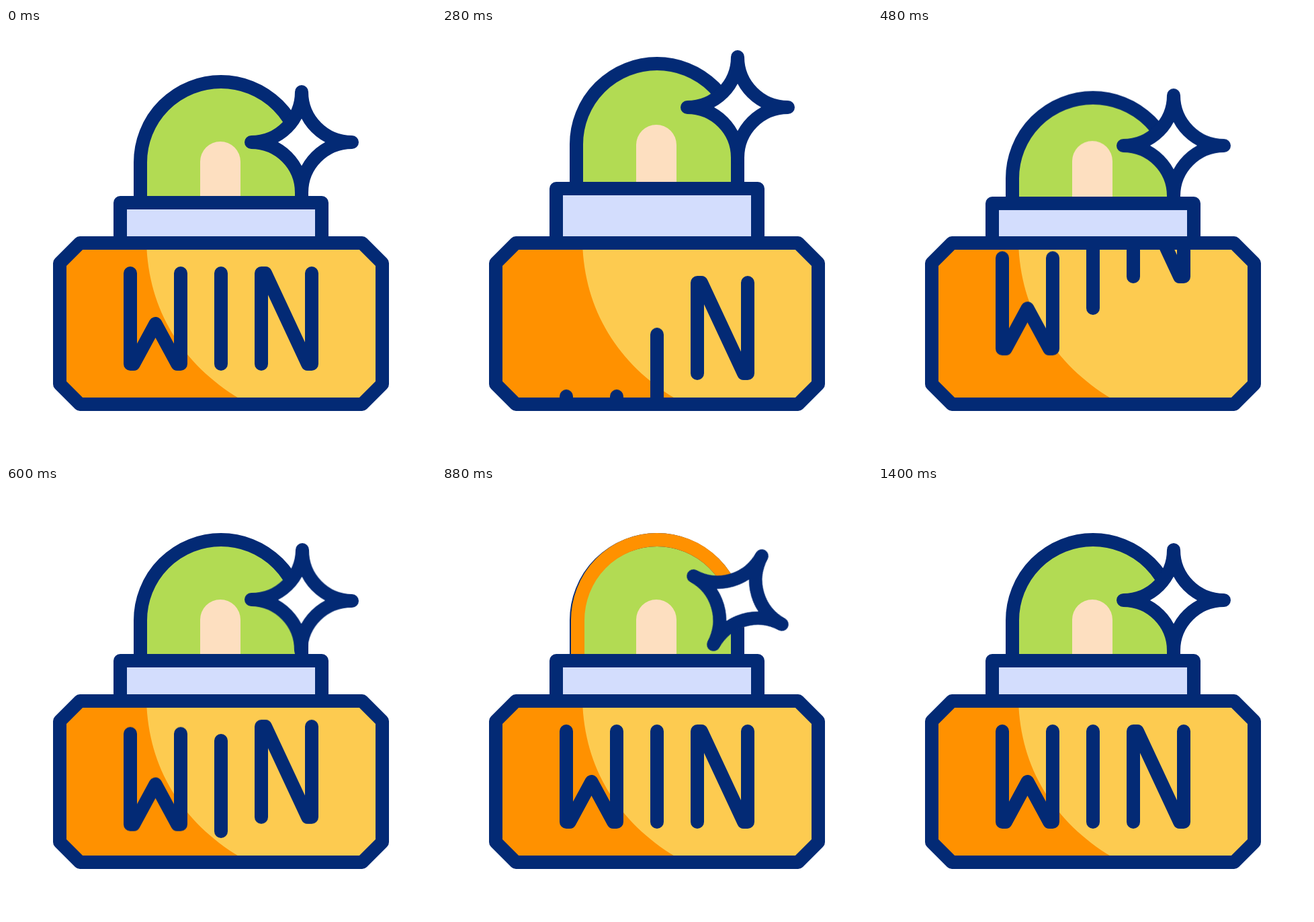
These frames come from a looping animation (640x640 px, 1.48 s). An HTML page:

```html
<!DOCTYPE html>
<html lang="en">
<head>
<meta charset="utf-8">
<title>Win light</title>
<style>
  html, body { margin: 0; width: 100%; height: 100%; overflow: hidden; background: #fff; }
  svg { display: block; width: 100%; height: 100%; }

  .line { stroke: #032a75; stroke-width: 20; stroke-linecap: round; stroke-linejoin: round; }
  .hop, .spin, .glow, .letter { animation: 1480ms linear infinite; }
  .hop { animation-name: hop; animation-timing-function: cubic-bezier(.37, 0, .63, 1); }
  .spin { animation-name: spin; transform-origin: 440px 170px; }
  .glow { fill: none; stroke: #ff9100; }
  .glow.band { animation-name: band, swell; }
  .glow.tail { animation-name: tail, swell; stroke-linecap: round; stroke-dasharray: 0 1500; }
  .w { animation-name: drop-w; }
  .i { animation-name: drop-i; }
  .n { animation-name: drop-n; }

  /* Shared jump; each part sets its own rise and dip. */
  @keyframes hop {
    0%, 5.405% { transform: translateY(0); }
    18.919% { transform: translateY(var(--rise)); }
    29.73% { transform: translateY(var(--dip)); }
    40.541%, 100% { transform: translateY(0); }
  }
  @keyframes spin {
    0%, 39.189% { transform: rotate(0deg); animation-timing-function: cubic-bezier(.37, 0, .63, 1); }
    72.973%, 100% { transform: rotate(180deg); }
  }

  /* The glow fills the dome from the left, then its tail follows. */
  @keyframes band {
    0%, 40.541% { stroke-dasharray: 0 1500; stroke-dashoffset: 0; }
    51.351% { stroke-dasharray: 226 1500; stroke-dashoffset: 0; }
    62.162% { stroke-dasharray: 556 1500; stroke-dashoffset: 0; }
    72.973% { stroke-dasharray: 556 1500; stroke-dashoffset: -226; }
    83.784%, 100% { stroke-dasharray: 556 1500; stroke-dashoffset: -556; }
  }
  @keyframes tail {
    0%, 62.162% { stroke-dashoffset: 0; }
    72.973% { stroke-dashoffset: -226; }
    83.784%, 100% { stroke-dashoffset: -553; }
  }
  @keyframes swell {
    0%, 40.541% { stroke-width: 16; }
    51.351% { stroke-width: 18; }
    72.973% { stroke-width: 23.5; }
    83.784%, 100% { stroke-width: 24; }
  }

  /* Letters leave through the floor and return from the ceiling. */
  @keyframes drop-w {
    0%, 5.405% { transform: translateY(0); animation-timing-function: ease-in; }
    8.108% { transform: translateY(13px); }
    13.514% { transform: translateY(90px); }
    20.27% { transform: translateY(205px); }
    20.28% { transform: translateY(-200px); }
    24.324% { transform: translateY(-141px); }
    32.432% { transform: translateY(-24px); animation-timing-function: ease-out; }
    35.811% { transform: translateY(14px); animation-timing-function: ease-in-out; }
    43.243%, 100% { transform: translateY(0); }
  }
  @keyframes drop-i {
    0%, 10.811% { transform: translateY(0); animation-timing-function: ease-in; }
    13.514% { transform: translateY(13px); }
    18.919% { transform: translateY(90px); }
    24.324% { transform: translateY(182px); }
    25.338% { transform: translateY(205px); }
    25.348% { transform: translateY(-190px); }
    32.432% { transform: translateY(-84px); }
    37.838% { transform: translateY(-8px); animation-timing-function: ease-out; }
    40.541% { transform: translateY(14px); animation-timing-function: ease-in-out; }
    46.622%, 100% { transform: translateY(0); }
  }
  @keyframes drop-n {
    0%, 16.216% { transform: translateY(0); animation-timing-function: ease-in; }
    18.919% { transform: translateY(13px); }
    24.324% { transform: translateY(90px); }
    29.73% { transform: translateY(195px); }
    29.74% { transform: translateY(-175px); }
    32.432% { transform: translateY(-131px); }
    40.541% { transform: translateY(-8px); animation-timing-function: ease-out; }
    43.243% { transform: translateY(12px); animation-timing-function: ease-in-out; }
    49.324%, 100% { transform: translateY(0); }
  }
</style>
</head>
<body>
<svg viewBox="0 0 640 640" role="img" aria-label="WIN">
  <defs>
    <path id="panel" d="M110 320H530L560 350V530L530 560H110L80 530V350Z"/>
    <path id="arc" d="M202 290V200A118 120 0 0 1 320 80A120 120 0 0 1 440 200V290"/>
    <clipPath id="window"><use href="#panel"/></clipPath>
  </defs>

  <path class="line hop" style="--rise:-27px;--dip:28px" fill="#b2db53" d="M200 290V200A120 120 0 0 1 440 200V290"/>
  <path class="hop" style="--rise:-25px;--dip:-1px" fill="#fddfc0" d="M289 300V199A30 30 0 0 1 349 199V300Z"/>
  <use class="glow band" href="#arc"/>
  <use class="glow tail" href="#arc"/>

  <g class="hop" style="--rise:-52px;--dip:6px">
    <path class="line spin" fill="#fff" d="M440 95A75 75 0 0 0 515 170A75 75 0 0 0 440 245A75 75 0 0 0 365 170A75 75 0 0 0 440 95Z"/>
  </g>

  <rect class="line hop" style="--rise:-21px;--dip:1.2px" fill="#d3ddfd" x="170" y="260" width="300" height="100"/>

  <g clip-path="url(#window)">
    <use href="#panel" fill="#fdcb50"/>
    <path fill="#ff9100" d="M70 310H209V320C212 420 262 500 348 552V570H70Z"/>
    <g class="line" fill="none">
      <path class="letter w" d="M185 365V500H190L222.5 440L255 500H260V365"/>
      <path class="letter i" d="M320 365V500"/>
      <path class="letter n" d="M380 500V365H386L449 500H455V365"/>
    </g>
  </g>
  <use class="line" href="#panel" fill="none"/>
</svg>
</body>
</html>
```
